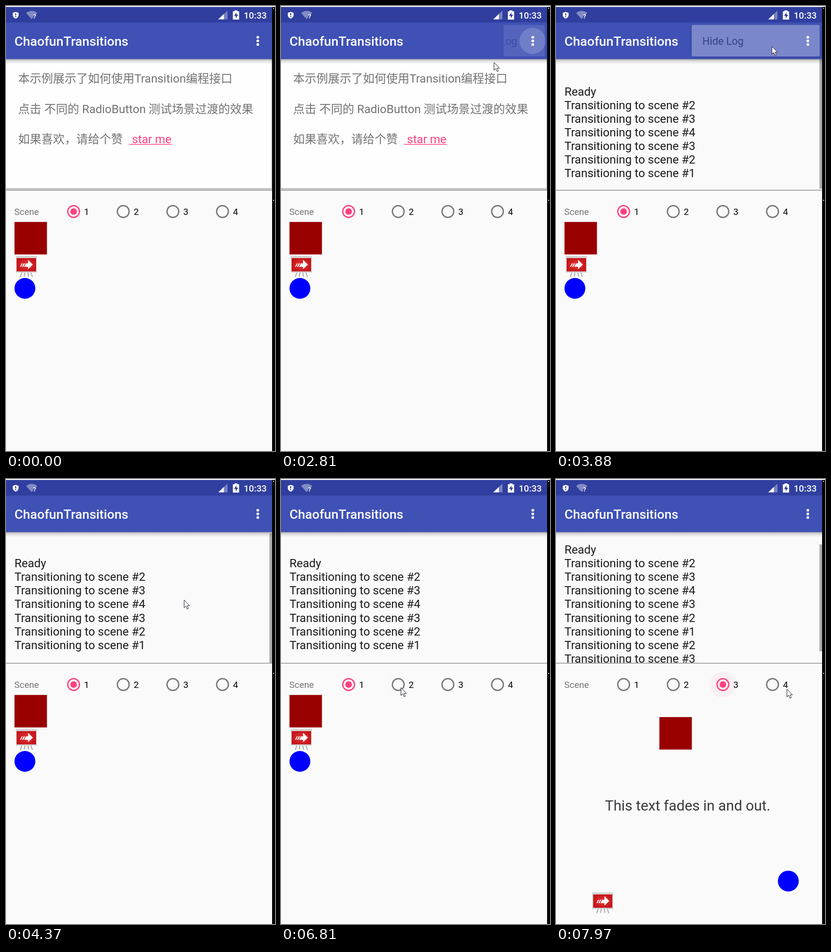
Recreate the animation shown at these times as an HTML page. Size 555 px wide and 918 px high, loop 8000 ms.

```html
<!DOCTYPE html>
<html lang="zh-CN">
<head>
<meta charset="utf-8">
<title>Transitions</title>
<style>
  html, body { margin: 0; width: 100%; height: 100%; overflow: hidden; background: #fafafa; }
  svg { display: block; width: 555px; height: 918px; }
  text { font-family: Roboto, "Noto Sans CJK SC", "Noto Sans CJK", sans-serif; white-space: pre; }
  .note { font-size: 24px; fill: #737373; }
  .log { font-size: 24px; fill: #1c1c1c; }
  .small { font-size: 18.7px; }
</style>
</head>
<body>
<svg viewBox="0 0 555 918" xmlns="http://www.w3.org/2000/svg">
  <defs>
    <linearGradient id="shade" x2="0" y2="1">
      <stop offset="0" stop-opacity=".34"/>
      <stop offset=".4" stop-opacity=".12"/>
      <stop offset="1" stop-opacity="0"/>
    </linearGradient>
    <radialGradient id="red">
      <stop offset="0" stop-color="#e8393c"/>
      <stop offset="1" stop-color="#c4161b"/>
    </radialGradient>
    <clipPath id="pane"><rect y="109" width="549" height="270"/></clipPath>
    <clipPath id="menuClip"><rect id="menuHole" y="39" height="65"/></clipPath>
  </defs>
  <rect width="555" height="918" fill="#fafafa"/>

  <g id="intro">
    <rect y="109" width="549" height="271" fill="#c6c6c6"/>
    <rect y="109" width="547.5" height="266.5" fill="#fefefe"/>
    <text class="note" x="25" y="158">本示例展示了如何使用Transition编程接口</text>
    <text class="note" x="25" y="220.5">点击 不同的 RadioButton 测试场景过渡的效果</text>
    <text class="note" x="25" y="283">如果喜欢，请给个赞</text>
    <text class="note" x="260" y="283" style="fill:#ff4081">star me</text>
    <rect x="254" y="284.7" width="88" height="1.5" fill="#ff4081"/>
  </g>
  <g id="logPane" clip-path="url(#pane)">
    <g id="lines"></g>
    <rect id="bar" x="543.5" width="5.5" fill="#adadad"/>
  </g>
  <rect y="379" width="549" height="2" fill="#aaa"/>

  <text class="small" x="17" y="431" fill="#757575">Scene</text>
  <g id="radios"></g>

  <rect id="square" width="67" height="67" fill="#900"/>
  <g id="board">
    <path d="M12.500 34L9.500 43M31.500 34L34.500 43M19 34L17.500 42M25 34L26.500 42" stroke="#a9a9a9" stroke-width="2"/>
    <rect x="2" y="4" width="40" height="28" fill="url(#red)"/>
    <path d="M1.500 3V32M42.500 3V32" stroke="#d0bcbc"/>
    <rect y="0" width="44" height="3.500" rx="1.500" fill="#cfcfcf"/>
    <rect y="31.500" width="44" height="2.500" rx="1" fill="#d4d4d4"/>
    <path d="M9 22l3.500-7h2l-3.500 7zM13 22l3.500-7h2.500l-3.500 7zM17.500 22l3.500-7h4.500V7.500L35.500 17.500 25.500 27V22z" fill="#fff"/>
  </g>
  <circle id="ball" r="21.500" fill="#00f"/>
  <text id="fading" x="101" y="684" font-size="29.700" fill="#212124">This text fades in and out.</text>

  <rect y="109" width="549" height="11" fill="url(#shade)"/>
  <rect y="34" width="549" height="75.500" fill="#3f51b5"/>
  <rect y="2" width="549" height="32" fill="#303f9f"/>
  <rect width="555" height="2" fill="#fcfcfc"/>
  <text x="17.500" y="82" font-size="26.700" font-weight="500" fill="#fff">ChaofunTransitions</text>

  <g fill="#fff">
    <path d="M20 12l6 2.300v4.200c0 3.500-2.500 6.200-6 7.500-3.500-1.300-6-4-6-7.500v-4.200z"/>
    <path d="M20 15v4.500M20 21v2" stroke="#303f9f" stroke-width="2.200"/>
    <path d="M41.500 14.500C48 8.500 58 8.500 64.500 14.500L62 17.500H56V23.500L53 27z" opacity=".4"/>
    <text x="55.500" y="26" font-size="13.500" font-weight="700">?</text>
    <path d="M438 27.500L457 9.500V27.500z" opacity=".35"/>
    <path d="M438 27.500L449.500 16.500V27.500z"/>
    <path d="M468 11H471.500V9H477.500V11H481V28H468z"/>
    <path d="M475.500 13L470.500 20.500H474V25.500L479 18H475.500z" fill="#303f9f"/>
    <text class="small" x="490.500" y="26" font-weight="500">10:33</text>
    <circle id="press" cx="519" cy="72" r="27"/>
    <circle cx="519.500" cy="64.500" r="2.800"/>
    <circle cx="519.500" cy="72" r="2.800"/>
    <circle cx="519.500" cy="79.500" r="2.800"/>
  </g>

  <g id="menu">
    <rect id="sheet" y="39" height="65" rx="2.500" fill="#fafafa" style="filter:drop-shadow(0 3px 4px rgba(0,0,0,.35))"/>
    <g clip-path="url(#menuClip)">
      <rect id="touch" x="280" y="39" width="264" height="65" fill="#000"/>
      <text id="item" y="80" font-size="21.400" fill="#212121"></text>
    </g>
  </g>

  <rect x="549" y="2" width="6" height="916"/>
  <path d="M551 4h2v2h-2zM551 400h2v2h-2z" fill="#ddd"/>
  <path id="cursor" d="M.5 .5V16.500L4.200 13 7 19.200 9.500 18.100 6.800 12.200H11.800z" fill="#fff" stroke="#1c1c28"/>
</svg>
<script>
const LOOP = 8000;
const SHOW_LOG = 3790, TO_TWO = 6895, TO_THREE = 7737;
const NS = 'http://www.w3.org/2000/svg';
const $ = id => document.getElementById(id);
const set = (el, attrs) => { for (const k in attrs) el.setAttribute(k, attrs[k]); };
const add = (parent, tag, attrs, text = '') => {
  const el = document.createElementNS(NS, tag);
  set(el, attrs);
  el.textContent = text;
  return parent.appendChild(el);
};
const lerp = (a, b, p) => a + (b - a) * p;
const ramp = (t, from, to) => Math.min(1, Math.max(0, (t - from) / (to - from)));
const ease = p => (1 - Math.cos(Math.PI * p)) / 2;
const place = (el, [x, y]) => set(el, { transform: `translate(${x} ${y})` });
const show = (el, on) => set(el, { visibility: on ? 'visible' : 'hidden' });

// Pointer stops: time, x, y
const stops = [
  [310, 477, 823], [380, 444, 772],
  [880, 460, 640], [955, 496, 260], [1030, 509, 108],
  [1490, 512, 86], [1570, 514, 66],
  [2640, 490, 90], [2720, 455, 112], [2800, 439, 116],
  [3260, 442, 100], [3340, 445, 83],
  [3960, 429, 126], [4030, 390, 215], [4110, 367, 249],
  [5750, 310, 330], [5830, 265, 400], [5910, 250, 426], [5990, 247, 430],
  [7420, 290, 432], [7500, 340, 430], [7580, 361, 430],
  [7810, 400, 432], [7890, 450, 433], [7970, 476, 433]
];

// Places of each shape in scenes 1, 2 and 3
const shapes = {
  square: [[17.5, 445.5], [17.5, 832], [239.5, 445.5]],
  board: [[20, 516], [481, 853], [20, 853]],
  ball: [[39, 582.5], [272.5, 467], [507, 878]]
};

const scenes = [2, 3, 4, 3, 2, 1, 2, 3];
const lines = ['Ready', ...scenes.map(n => 'Transitioning to scene #' + n)]
  .map((s, i) => add($('lines'), 'text', { class: 'log', x: 17.5, y: 182 + i * 28.13 }, s));

const radios = [1, 2, 3, 4].map((n, i) => {
  const cx = 139.5 + i * 102.4, cy = 424;
  const halo = add($('radios'), 'circle', { cx, cy, r: 27 });
  const ring = add($('radios'), 'circle', { cx, cy, r: 12.1, fill: 'none', 'stroke-width': 2.7 });
  const dot = add($('radios'), 'circle', { cx, cy, r: 6.8, fill: '#ff4081' });
  add($('radios'), 'text', { class: 'small', x: cx + 21.5, y: 431 }, n);
  return { halo, ring, dot };
});

function drawMenu(t) {
  const open = ease(ramp(t, 2725, 2980));
  const gone = ramp(t, 3780, 3927);
  const left = lerp(519, 280, open);
  const box = { x: left, width: 544 - left };
  set($('sheet'), box);
  set($('menuHole'), box);
  set($('menu'), { opacity: Math.min(1, open * open * 1.8) * (1 - gone) });
  show($('menu'), open > 0 && gone < 1);
  set($('item'), { x: 302 + 122 * (1 - open) });
  $('item').textContent = t < SHOW_LOG ? 'Show Log' : 'Hide Log';
  set($('touch'), { opacity: 0.1 * ramp(t, 3600, 3700) * (1 - ramp(t, 3740, 3790)) });
  const hold = ramp(t, 2330, 2530);
  set($('press'), { r: lerp(8, 27, hold), opacity: 0.17 * hold * (1 - ramp(t, 2830, 3080)) });
}

function drawLog(t) {
  const on = t >= SHOW_LOG;
  show($('intro'), !on);
  show($('logPane'), on);
  const scroll = ease(ramp(t, TO_THREE, TO_THREE + 230));
  const early = t < 4370;
  place($('lines'), [0, early ? 2.7 : -28.1 * scroll]);
  set(lines[7], { opacity: t < TO_TWO ? 0 : 1 });
  set(lines[8], { opacity: t < TO_THREE ? 0 : 1 });
  const late = t >= TO_THREE;
  set($('bar'), {
    y: late ? lerp(114, 135, scroll) : early ? 110 : 112,
    height: late ? 220.5 : 267,
    opacity: late ? 1 : 1 - ramp(t, 5510, 5760)
  });
}

function drawScene(t) {
  const p = ease(ramp(t, TO_TWO, TO_TWO + 300));
  const q = ease(ramp(t, TO_THREE, TO_THREE + 300));
  for (const id in shapes) {
    const [a, b, c] = shapes[id];
    place($(id), a.map((v, i) => q > 0 ? lerp(b[i], c[i], q) : lerp(v, b[i], p)));
  }
  set($('fading'), { opacity: q });

  const chosen = t < TO_TWO ? 0 : t < TO_THREE ? 1 : 2;
  radios.forEach(({ halo, ring, dot }, i) => {
    const on = i === chosen;
    set(ring, { stroke: on ? '#ff4081' : '#757575' });
    show(dot, on);
    const start = [0, 6800, 7610][i];
    const glow = start ? ramp(t, start, start + 50) * (1 - ramp(t, start + 400, start + 620)) : 0;
    set(halo, { fill: on ? '#ff4081' : '#000', opacity: (on ? 0.05 : 0.022) * glow });
  });
}

function draw(t) {
  drawMenu(t);
  drawLog(t);
  drawScene(t);
  const stop = stops.filter(s => s[0] <= t).pop();
  show($('cursor'), stop);
  if (stop) place($('cursor'), stop.slice(1));
}

let begin;
function tick(now) {
  begin ??= now;
  draw((now - begin) % LOOP);
  requestAnimationFrame(tick);
}
draw(0);
requestAnimationFrame(tick);
</script>
</body>
</html>
```
